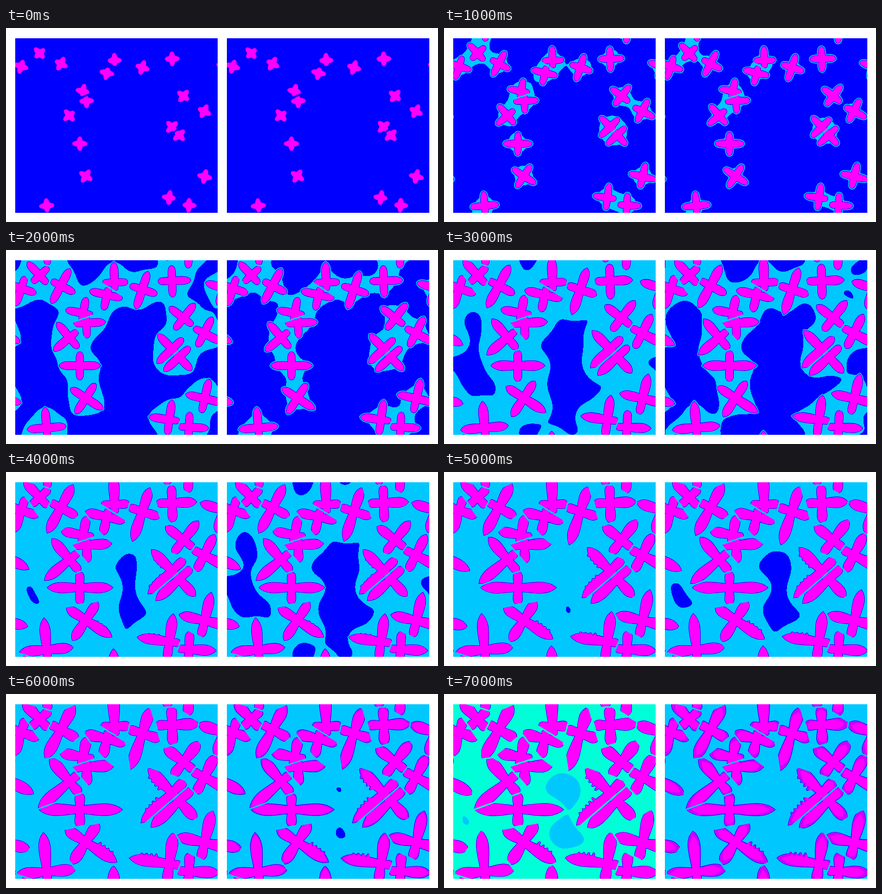
An HTML page with a canvas for the animation above (8 s loop, 796 by 359 pixels).

```html
<!DOCTYPE html>
<html lang="en">
<head>
<meta charset="utf-8">
<title>Crystal growth</title>
<style>
  html, body { margin: 0; width: 100%; height: 100%; overflow: hidden; background: #fff; }
  canvas { display: block; }
</style>
</head>
<body>
<canvas id="stage" width="796" height="359"></canvas>
<script>
const W = 373, H = 323, LEFT = 17, TOP = 19, STEPS = 8, STEP_MS = 1000;
const BLUE = '#0000ff', SKY = '#00c8ff', TEAL = '#00ffd8', PINK = '#ff00ff', PURPLE = '#c800ff';

// Seeds: x, y and rotation in degrees. Everything else follows from these.
const seeds = [
  [28, 71, 18], [62, 47, 47], [101, 66, 28], [200, 60, -2], [186, 83, 13],
  [251, 73, 18], [306, 57, -2], [327, 126, 38], [365, 154, 27], [306, 183, 46],
  [319, 198, 47], [142, 117, 11], [148, 135, -3], [117, 162, 50], [136, 214, 0],
  [147, 274, 33], [75, 329, -5], [301, 314, 8], [337, 328, 3], [366, 275, 13]
];
const pool = [228, 225]; // the widest open space; side branches sprout towards it
const GAP = 1.4;

const panels = [
  { x: LEFT, rate: .19, settle: .008, rim: 0, tealShare: .047 },
  { x: 407, rate: .095, settle: .03, rim: 1.5, tealShare: 0 }
];

const clamp = v => Math.max(0, Math.min(1, v));
const wrap = (d, size) => d - size * Math.round(d / size);

function makeCanvas(w, h) {
  const c = document.createElement('canvas');
  c.width = w;
  c.height = h;
  return c.getContext('2d', { willReadFrequently: true });
}

// Keeps the part of a polygon where p . (vx, vy) <= limit.
function cutPolygon(points, vx, vy, limit) {
  const out = [];
  points.forEach((p, i) => {
    const q = points[(i + 1) % points.length];
    const a = p[0] * vx + p[1] * vy - limit, b = q[0] * vx + q[1] * vy - limit;
    if (a <= 0) out.push(p);
    if (a * b < 0) {
      const t = a / (a - b);
      out.push([p[0] + t * (q[0] - p[0]), p[1] + t * (q[1] - p[1])]);
    }
  });
  return out;
}

// Each crystal owns the space nearest to it; its arms reach to the border.
const crystals = seeds.map(([x, y, deg], i) => {
  const near = seeds.filter((_, j) => j !== i)
    .map(([ox, oy]) => [wrap(ox - x, W), wrap(oy - y, H)]);
  let cell = [[-130, -130], [130, -130], [130, 130], [-130, 130]];
  for (const [vx, vy] of near) {
    const d = Math.hypot(vx, vy);
    cell = cutPolygon(cell, vx / d, vy / d, d / 2 - GAP);
  }
  const clip = new Path2D();
  cell.forEach(p => clip.lineTo(...p));
  clip.closePath();

  const arms = [0, 1, 2, 3].map(n => {
    const a = (deg + 90 * n) * Math.PI / 180, cos = Math.cos(a), sin = Math.sin(a);
    let reach = 95;
    for (const [vx, vy] of near) {
      const along = vx * cos + vy * sin;
      if (along > 0) reach = Math.min(reach, (vx * vx + vy * vy) / (2 * along));
    }
    const px = pool[0] - x, py = pool[1] - y;
    const ahead = px * cos + py * sin, aside = py * cos - px * sin;
    const branched = reach > 60 && ahead > 0 && ahead < 100 &&
      Math.abs(aside) > 20 && Math.abs(aside) < 90;
    return { a, cos, sin, reach: Math.max(15, reach), side: branched ? Math.sign(aside) : 0 };
  });
  return { x: x - LEFT, y: y - TOP, clip, arms };
});

// Tips advance evenly, then slow down near the border of the cell.
function armLength(reach, k) {
  const run = 14 + 12.2 * k, limit = reach * 1.08, p = 1 + limit / 25;
  return run / (1 + (run / limit) ** p) ** (1 / p);
}

function shape({ arms }, k, inset) {
  const path = new Path2D();
  for (const { a, cos, sin, reach, side } of arms) {
    const at = (x, y) => [x * cos - y * sin, x * sin + y * cos];
    const full = armLength(reach, k);
    const cut = inset * Math.min(1, full / 50);
    const len = full - 3 * cut;
    const slim = clamp((full - 20) / 30);
    const girth = (3.8 + 8 * (k / 7) ** .7) * (.9 + .15 * slim) - cut;
    const neck = 7 - cut / 2;
    const c1 = [len * .36, 5 + 3 * slim - cut / 2];
    const c2 = [len * (1.02 - .28 * slim), girth * (1.4 + .15 * slim)];
    path.moveTo(...at(0, -neck));
    path.bezierCurveTo(...at(c1[0], -c1[1]), ...at(c2[0], -c2[1]), ...at(len, 0));
    path.bezierCurveTo(...at(...c2), ...at(...c1), ...at(0, neck));
    path.closePath();

    if (!side || k < 4) continue;
    const tall = 2 * (k - 3);
    for (let d = len * .35; d < len * .8; d += 9) {
      const [x, y] = at(d, side * girth * .75);
      path.ellipse(x, y, 2.2, 2 + tall * (1 - d / len), a, 0, 2 * Math.PI);
      path.closePath();
    }
  }
  return path;
}

// Calls paint for every crystal and its visible periodic copies.
function eachCrystal(ctx, k, inset, paint) {
  for (const c of crystals) {
    const path = shape(c, k, inset);
    for (let x = c.x - W; x < W + 110; x += W) for (let y = c.y - H; y < H + 110; y += H) {
      if (x < -110 || y < -110) continue;
      ctx.save();
      ctx.translate(x, y);
      ctx.clip(c.clip);
      paint(path);
      ctx.restore();
    }
  }
}

function solid(k) {
  const ctx = makeCanvas(W, H);
  eachCrystal(ctx, k, 0, p => ctx.fill(p));
  const data = ctx.getImageData(0, 0, W, H).data;
  return Float32Array.from({ length: W * H }, (_, i) => data[4 * i + 3] / 255);
}

function boxBlur(src, n, stride, lines, lineStride, r = 13) {
  const out = new Float32Array(src.length);
  for (let l = 0; l < lines; l++) {
    const base = l * lineStride;
    const get = i => src[base + ((i + n) % n) * stride];
    let sum = 0;
    for (let i = -r; i <= r; i++) sum += get(i);
    for (let i = 0; i < n; i++) {
      out[base + i * stride] = sum / (2 * r + 1);
      sum += get(i + r + 1) - get(i - r);
    }
  }
  return out;
}

function diffuse(u) {
  for (let i = 0; i < 3; i++) {
    u = boxBlur(u, W, 1, H, W);
    u = boxBlur(u, H, W, W, 1);
  }
  return u;
}

const rgb = hex => [1, 3, 5].map(i => parseInt(hex.slice(i, i + 2), 16));

function drawPanel(field, sorted, k, { rate, settle, rim, tealShare }) {
  const ctx = makeCanvas(W, H);
  const teal = k === STEPS - 1 && tealShare > 0;
  // share of the panel still below the contour level
  const share = teal ? tealShare : clamp(Math.exp(-rate * k * k) - settle);
  const level = k ? sorted[Math.floor(share * (sorted.length - 1))] : Infinity;
  const below = rgb(teal ? SKY : BLUE), above = rgb(teal ? TEAL : SKY);
  const img = ctx.createImageData(W, H);
  field.forEach((v, i) => img.data.set([...(v < level ? below : above), 255], 4 * i));
  ctx.putImageData(img, 0, 0);

  ctx.lineJoin = 'round';
  const outline = (color, width) => eachCrystal(ctx, k, 0, p => {
    ctx.strokeStyle = color;
    ctx.lineWidth = width;
    ctx.stroke(p);
  });
  const fill = (color, inset) => eachCrystal(ctx, k, inset, p => {
    ctx.fillStyle = color;
    ctx.fill(p);
  });
  const band = Math.max(0, rim * (k - 5));
  if (k) outline(teal ? TEAL : SKY, 5);
  outline(BLUE, 1.7);
  if (band) fill(PURPLE, 0);
  fill(PINK, band);
  return ctx.canvas;
}

// Each step adds the newly solid area to the field and lets it spread.
const scenes = [];
let field = new Float32Array(W * H), before = new Float32Array(W * H);
for (let k = 0; k < STEPS; k++) {
  const now = solid(k);
  field = diffuse(field.map((v, i) => v + now[i] - before[i]));
  before = now;
  const sorted = field.slice().sort();
  scenes.push(panels.map(p => drawPanel(field, sorted, k, p)));
}

const stage = document.getElementById('stage').getContext('2d');
const start = performance.now();
let shown = -1;

function tick() {
  const k = Math.floor((performance.now() - start) / STEP_MS) % STEPS;
  if (k !== shown) {
    shown = k;
    stage.fillStyle = '#fff';
    stage.fillRect(0, 0, 796, 359);
    scenes[k].forEach((c, i) => stage.drawImage(c, panels[i].x, TOP));
  }
  requestAnimationFrame(tick);
}
tick();
</script>
</body>
</html>
```
